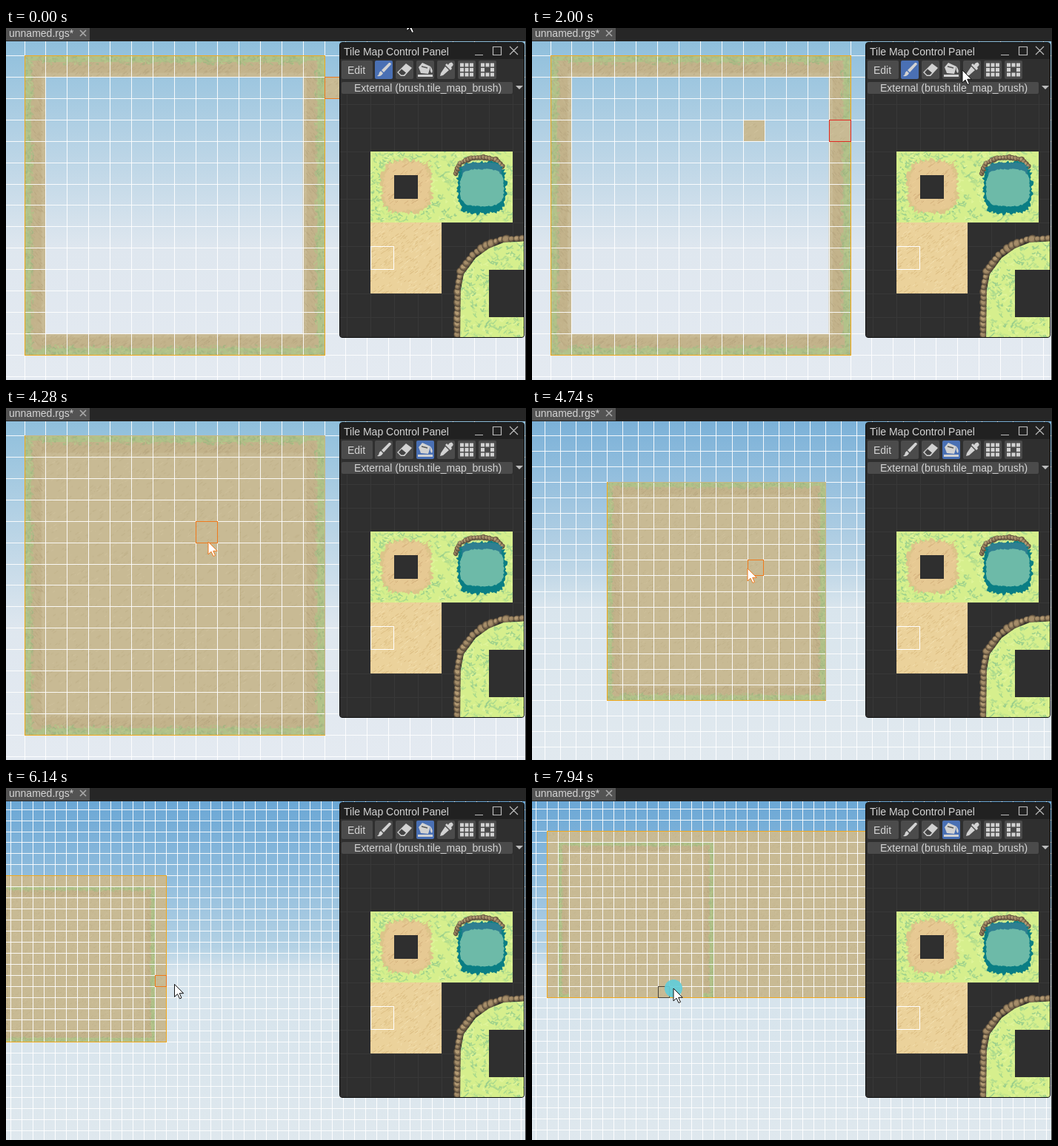
Recreate the animation shown at these times as an HTML page with a canvas. Size 702 by 476 pixels, loop 8 s.

```html
<!DOCTYPE html>
<html lang="en">
<head>
<meta charset="utf-8">
<title>Tile map editor</title>
<style>
html, body { margin: 0; width: 100%; height: 100%; overflow: hidden; background: #262626; }
#stage { position: relative; width: 702px; height: 476px; overflow: hidden;
  font: 14px/16px "Liberation Sans", Arial, sans-serif; color: #d4d4d4; white-space: nowrap; }
#stage > *, #panel > * { position: absolute; left: 0; top: 0; }
#stage #bar { width: 702px; height: 18px; background: #262626; }
#stage #tab { width: 113px; height: 17px; background: #535353; }
#tab span { position: absolute; left: 4px; top: -1px; }
#tab svg { position: absolute; left: 99px; top: 2px; }
#stage #panel { left: 450px; top: 19px; width: 248px; height: 398px; border: 1px solid #0c0c0c;
  border-radius: 4px; background: #2f2f2f; overflow: hidden; }
#panel #title { width: 248px; height: 22px; background: #212121; }
#title span { position: absolute; left: 5px; top: 4px; }
#title svg { position: absolute; left: 178px; top: 0; }
#panel .btn { top: 24px; width: 24px; height: 25px; background: #4b4b4b; border-radius: 2px; }
#panel .btn.on { background: #4a70b4; }
.btn svg { display: block; width: 24px; height: 25px; }
#panel #edit { left: 2px; width: 42px; }
#edit span { position: absolute; left: 8px; top: 5px; }
#panel #drop { left: 2px; top: 53px; width: 231px; height: 16px; background: #4b4b4b; border-radius: 2px; }
#drop span { position: absolute; left: 17px; top: 0; }
#panel #arrow { left: 237px; top: 58px; border: 5px solid transparent; border-top-color: #bdbdbd; }
#panel #tiles { top: 70px; }
#stage #edge { left: 701px; top: 18px; width: 1px; height: 458px; background: #3c3c3c; }
#ring { width: 24px; height: 24px; margin: -12px; border-radius: 50%; background: #62ccd8; opacity: .92; }
#cursor { overflow: visible; }
</style>
</head>
<body>
<div id="stage">
  <canvas id="scene" width="702" height="476"></canvas>
  <div id="edge"></div>
  <div id="bar"></div>
  <div id="tab"><span>unnamed.rgs*</span>
    <svg width="11" height="11" stroke="#aaa" stroke-width="1.6"><path d="M1 1L9 9M9 1L1 9"/></svg></div>
  <div id="panel">
    <canvas id="tiles" width="248" height="328"></canvas>
    <div id="title"><span>Tile Map Control Panel</span>
      <svg width="70" height="22" fill="none" stroke="#bcbcbc" stroke-width="1.2"><path d="M4 16.5H15M28.5 5.5H39.5V16.5H28.5ZM51 5L62 16M62 5L51 16"/></svg></div>
    <div id="edit" class="btn"><span>Edit</span></div>
    <div id="drop"><span>External (brush.tile_map_brush)</span></div>
    <div id="arrow"></div>
  </div>
  <div id="ring"></div>
  <svg id="cursor" width="14" height="21"><path d="M0 0V17L4 13.2L7 19.5L9.5 18.4L6.7 12.3H12.2Z" fill="#fff"/></svg>
</div>
<script>
const $ = id => document.getElementById(id);
const LOOP = 8000, TICKS = 120, N = 14;

let seed = 7;
const rnd = () => (seed = (seed * 16807) % 2147483647) / 2147483647;
const span = (a, b) => a + (b - a) * rnd();
const pick = list => list[Math.floor(rnd() * list.length)];
const lerp = (a, b, u) => a + (b - a) * u;
const ramp = (k, a, b) => Math.min(1, Math.max(0, (k - a) / (b - a)));

// ---- toolbar ----
const squares = hole => [...Array(9).keys()].filter(i => !(hole && i === 4))
  .map(i => `<rect x="${3 + i % 3 * 6.5}" y="${3.5 + Math.floor(i / 3) * 6.5}" width="5" height="5"/>`).join('');
const ICONS = [
  '<path d="M21 3L22 5L12 16L9 13L19 3ZM8 14L11 17Q9 22 3 21Q6 19 6 16Z"/>',
  '<path d="M14 4L22 10L12 21H7L2 16Z"/><path d="M4 16L8 11.500L14 16.500L11 19.500H7.500Z" fill="#444"/>',
  '<path d="M8 3L19 8L16 18L6 17L3 9ZM19 8Q23 13 21 17Q18 16 19 8ZM2 19H22V22H2Z"/><path d="M7 8L15 10" stroke="#555" stroke-width="1.5"/>',
  '<path d="M16 4Q20 1 21 4Q23 6 19 9L20 11L18 13L11 6L13 4L15 6ZM11 8L16 13L8 20L4 21L5 17Z"/>',
  squares(false), squares(true)
];
const tools = ICONS.map((art, i) => {
  const b = document.createElement('div');
  b.className = 'btn';
  b.style.left = 47 + i * 28 + 'px';
  b.innerHTML = `<svg viewBox="0 0 24 25" fill="#d2d2d2">${art}</svg>`;
  $('panel').append(b);
  return b;
});

// ---- textures ----
function tufts(c, x, y, w, h, n, colors, len = 5) {
  c.lineWidth = 1.4;
  for (let i = 0; i < n; i++) {
    const px = x + rnd() * w, py = y + rnd() * h;
    c.strokeStyle = pick(colors);
    c.beginPath();
    for (let j = 0; j < 3; j++) {
      c.moveTo(px, py);
      c.lineTo(px + span(-len, len), py + span(-len, len * .5));
    }
    c.stroke();
  }
}
function streaks(c, x, y, w, h, n, colors) {
  c.lineWidth = 1;
  for (let i = 0; i < n; i++) {
    const px = x + rnd() * w, py = y + rnd() * h, l = span(1, 6);
    c.strokeStyle = pick(colors);
    c.beginPath();
    c.moveTo(px, py);
    c.lineTo(px + l, py - l * .7);
    c.stroke();
  }
}
function blob(c, x0, y0, x1, y1, jit, color) {
  c.fillStyle = color;
  c.beginPath();
  for (let a = 0; a < Math.PI * 2; a += .06) {
    const cs = Math.cos(a), sn = Math.sin(a);
    const r = (Math.abs(cs) ** 3.4 + Math.abs(sn) ** 3.4) ** (-1 / 3.4) + span(-jit, jit);
    c.lineTo((x0 + x1) / 2 + cs * r * (x1 - x0) / 2, (y0 + y1) / 2 + sn * r * (y1 - y0) / 2);
  }
  c.fill();
}
function rocks(c, pts, r) {
  for (let i = 1; i < pts.length; i++) {
    const [ax, ay] = pts[i - 1], [bx, by] = pts[i];
    const n = Math.ceil(Math.hypot(bx - ax, by - ay) / r / 1.4);
    for (let j = 0; j < n; j++) {
      const x = lerp(ax, bx, j / n), y = lerp(ay, by, j / n), s = r * span(.8, 1.2);
      ['#5f513e', pick(['#8f7a5b', '#7f6c52']), pick(['#b39a73', '#a58d69'])].forEach((col, d) => {
        c.fillStyle = col;
        c.beginPath();
        c.ellipse(x - d * .4, y - d * .4, s * (1 - d * .24), s * (.9 - d * .24), i, 0, 7);
        c.fill();
      });
    }
  }
}
function rect(c, color, ...box) {
  c.fillStyle = color;
  c.fillRect(...box);
}
function clipped(c, path, paint) {
  c.save();
  c.beginPath();
  path();
  c.clip();
  paint();
  c.restore();
}
const LEAF = ['#b3dd8e', '#a8d88d', '#9bcf8c', '#c6e78c', '#e0f59b'];
const DARK = '#2f2f2f', GRASS = '#d6ef8d';

function paintTiles() {
  const c = $('tiles').getContext('2d');
  rect(c, DARK, 0, 0, 248, 328);
  for (let x = 9; x < 248; x += 32) rect(c, '#383838', x, 0, 1, 328);
  for (let y = 13; y < 328; y += 32) rect(c, '#383838', 0, y, 248, 1);
  c.translate(-451, -90);

  clipped(c, () => c.rect(492, 167, 192, 96), () => {
    rect(c, GRASS, 492, 167, 192, 96);
    tufts(c, 492, 167, 192, 96, 520, LEAF);
    blob(c, 507, 179, 575, 250, .1, '#dcc48a');
    blob(c, 510, 182, 572, 247, .07, '#e6c993');
    streaks(c, 510, 182, 60, 62, 130, ['#d9b883', '#d4b07c', '#edd09a']);
    rocks(c, [[607, 197], [613, 183], [628, 176], [645, 175], [661, 178], [673, 190]], 3.6);
    blob(c, 609, 181, 675, 251, .08, '#0a7e84');
    blob(c, 615, 182, 669, 206, .06, '#2f7f91');
    blob(c, 613, 191, 672, 241, .03, '#6dbaa8');
  });
  rect(c, DARK, 524, 199, 32, 32);

  clipped(c, () => c.rect(492, 263, 96, 96), () => {
    rect(c, '#ebd29b', 492, 263, 96, 96);
    streaks(c, 488, 263, 100, 100, 420, ['#e0c388', '#dcbd82', '#f3dfae']);
  });
  c.strokeStyle = '#fff';
  c.strokeRect(492.5, 295.5, 31, 31);

  const rim = [[609, 422], [610, 350], [614, 329], [630, 307], [648, 294], [668, 286], [704, 284]];
  rocks(c, rim, 5.5);
  clipped(c, () => {
    rim.forEach(([x, y]) => c.lineTo(x + 4, y + 4));
    c.lineTo(704, 422);
  }, () => {
    rect(c, GRASS, 600, 280, 104, 140);
    tufts(c, 600, 280, 104, 140, 420, LEAF);
  });
  rect(c, DARK, 652, 327, 48, 64);
}

function surface(w, h) {
  const el = document.createElement('canvas');
  el.width = w;
  el.height = h;
  return [el, el.getContext('2d')];
}
const [sand, sandCtx] = surface(960, 480);
rect(sandCtx, '#c8ba94', 0, 0, 960, 480);
streaks(sandCtx, -5, 0, 965, 485, 6500, ['#bfb088', '#c2b38b', '#d2c49f']);

// border of grass turning into sand, same on all four sides
const [frame, frameCtx] = surface(N * 32, N * 32);
(function paintFrame(c) {
  c.drawImage(sand, 0, 0, 448, 448, 0, 0, 448, 448);
  for (let side = 0; side < 4; side++) {
    c.save();
    c.translate(224, 224);
    c.rotate(side * Math.PI / 2);
    c.translate(-224, -224);
    rect(c, '#c3b38b', 8, 8, 432, 18);
    streaks(c, 10, 14, 428, 15, 380, ['#b6a57f', '#bcab84', '#c8ba94']);
    rect(c, '#b2c28a', 0, 0, 448, 10);
    tufts(c, 0, 0, 448, 14, 400, ['#a8bd87', '#b0c387', '#9fb681', '#b9c88d', '#b5b587'], 4);
    c.restore();
  }
  c.clearRect(32, 32, 384, 384);
})(frameCtx);

// ---- motion, times in ticks of 1/15 s ----
const ZOOM = { x: 306, y: 269, cols: 9.73, rows: 8.02 };   // fixed point on stage and on the map
const CURSOR = [[4, 541, -13], [6, 562, 28], [13, 340, 147], [15, 300, 150], [20, 303, 150], [25, 425, 135],
  [29, 581, 57], [32, 581, 57], [34, 561, 50], [39, 561, 50], [45, 310, 148], [46, 310, 148], [51, 264, 163],
  [61, 264, 163], [70, 291, 217], [71, 291, 217], [74, 360, 274], [76, 360, 274], [79, 335, 286], [89, 335, 286],
  [101, 581, 266], [106, 581, 266], [112, 304, 351], [114, 316, 347]];
const DRAGS = [[77, 88], [113, 119]], CLICKS = [[19, 20], [57, 58]];
const during = (list, k) => list.some(([a, b]) => k >= a && k <= b);

function pan(k) {
  const u = ramp(k, 79, 88), v = ramp(k, 114, 119);
  return [-169 * u ** 3.4 + 44 * v, -15.6 * (1 - (1 - u) ** 2) - 60.4 * v];
}
function view(k) {
  const cell = 28.93 * Math.exp(-.659 * ramp(k, 64.2, 74) ** 2), [dx, dy] = pan(k);
  return { cell, x: ZOOM.x - ZOOM.cols * cell + dx, y: ZOOM.y - ZOOM.rows * cell + dy };
}
function cursor(k) {
  const j = CURSOR.findIndex(s => s[0] > k), b = CURSOR.at(j), a = CURSOR[j < 0 ? CURSOR.length - 1 : Math.max(0, j - 1)];
  const u = ramp(k, a[0], b[0] > a[0] ? b[0] : a[0] + 1), [dx, dy] = pan(k);
  return [lerp(a[1], b[1], u) + dx, lerp(a[2], b[2], u) + dy];
}
// the hovered cell trails by one tick and stays put over the panel and in drags
function hover(k) {
  for (let j = k - 1; j >= 0; j--) {
    const [x, y] = cursor(j), v = view(j);
    if (x < 450 && !during(DRAGS, j))
      return [Math.min(27, Math.floor((x - v.x) / v.cell)), Math.min(13, Math.floor((y - v.y) / v.cell))];
  }
  return [14, 1];
}

// sky stops: y, r, g, b when near and when far
const NEAR = [[18, 143, 191, 220], [215, 199, 219, 233], [300, 223, 231, 239], [476, 228, 234, 241]];
const FAR = [[18, 107, 167, 213], [215, 179, 209, 228], [247, 213, 227, 236], [476, 223, 232, 238]];
const g = $('scene').getContext('2d');

function sky(z) {
  const grad = g.createLinearGradient(0, 0, 0, 476);
  NEAR.forEach((s, i) => {
    const [y, ...rgb] = s.map((v, j) => lerp(v, FAR[i][j], z));
    grad.addColorStop(y / 476, `rgb(${rgb.map(Math.round)})`);
  });
  g.fillStyle = grad;
  g.fillRect(0, 0, 702, 476);
}

function draw(k) {
  const { x, y, cell } = view(k), [cx, cy] = cursor(k), [hc, hr] = hover(k);
  const px = c => Math.round(x + c * cell), py = r => Math.round(y + r * cell);
  const fillSand = (c, r, w, h) => g.drawImage(sand, 0, 0, w * 32, h * 32, x + c * cell, y + r * cell, w * cell, h * cell);
  sky((28.93 - cell) / 13.96);

  // the fill preview widens the map up to the hovered column
  const right = k < 90 ? N : k > 102 ? 28 : Math.max(N, hc + 1);
  const grown = right > N ? 1 : 0;
  if (grown) fillSand(-1, -1, right + 1, N + 1);
  if (k >= 50) fillSand(1, 1, 12, 12);
  g.drawImage(frame, x, y, N * cell, N * cell);
  if (k >= 113) fillSand(1, 13, 12, 1);
  if (k >= 18) fillSand(9, 3, 1, 1);
  fillSand(hc, hr, 1, 1);

  const line = 'rgba(255,255,255,.9)';
  for (let c = Math.floor(-x / cell); px(c) < 702; c++) rect(g, line, px(c), 18, 1, 458);
  for (let r = Math.floor(-y / cell); py(r) < 476; r++) rect(g, line, 0, py(r), 702, 1);

  const x0 = px(-grown), y0 = py(-grown), x1 = px(right), y1 = py(N);
  const gold = '#f3a91c', soft = k >= 62 && k < 90 ? '#c9b686' : gold;
  rect(g, soft, x0, y0, x1 - x0, 1);
  rect(g, soft, x1, y0, 1, y1 - y0);
  rect(g, gold, x0, y1, x1 - x0 + 1, 1);
  rect(g, gold, x0, y0, 1, y1 - y0);

  const ink = k >= 113 ? '#4a4438' : k >= 62 || hc === N ? '#f07a1c' : '#e22a24';
  g.strokeStyle = ink;
  g.strokeRect(px(hc) + .5, py(hr) + .5, px(hc + 1) - px(hc), py(hr + 1) - py(hr));

  const inside = Math.floor((cx - x) / cell) === hc && Math.floor((cy - y) / cell) === hr;
  $('cursor').style.stroke = inside ? ink : '#111';
  for (const id of ['cursor', 'ring']) $(id).style.transform = `translate(${cx}px,${cy}px)`;
  $('ring').style.display = during(DRAGS, k) || during(CLICKS, k) ? 'block' : 'none';
  tools.forEach((b, i) => b.classList.toggle('on', i === (k < 40 ? 0 : 2)));
}

paintTiles();
const start = performance.now();
let last = -1;
function tick(now) {
  const ms = Math.max(0, now - start) % LOOP;
  const k = Math.floor((ms + 12) / LOOP * TICKS) % TICKS;
  if (k !== last) draw(last = k);
  requestAnimationFrame(tick);
}
draw(0);
requestAnimationFrame(tick);
</script>
</body>
</html>
```
